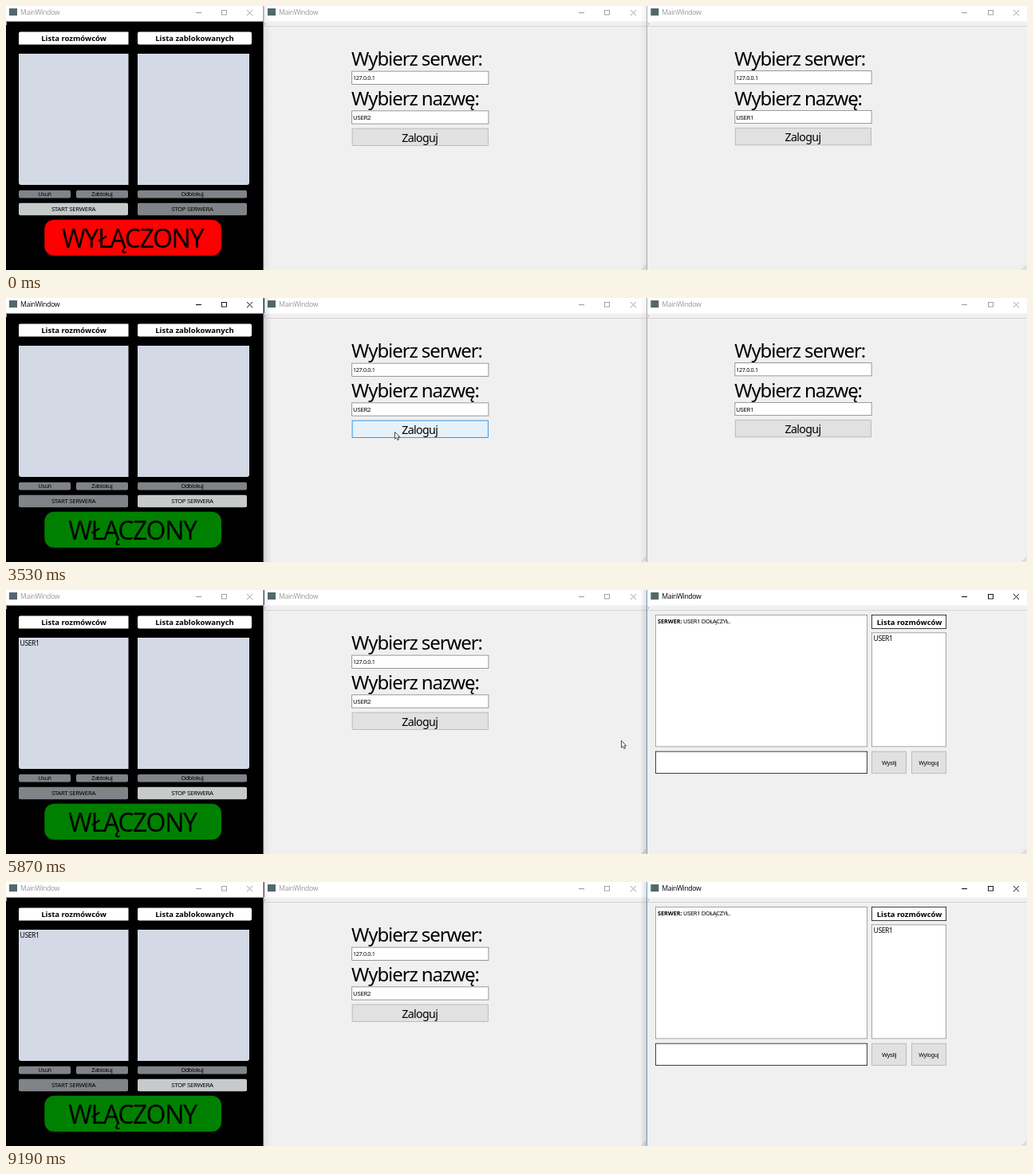
Recreate the animation shown at these times as an HTML page with a canvas. Size 1280 by 332 pixels, loop 9.66 s.

```html
<!DOCTYPE html>
<html lang="pl">
<head>
<meta charset="utf-8">
<title>MainWindow</title>
<style>
html, body { margin: 0; width: 100%; height: 100%; overflow: hidden; background: #f0f0f0; }
canvas { display: block; }
</style>
</head>
<body>
<canvas id="stage" width="1280" height="332"></canvas>
<script>
const ctx = document.getElementById('stage').getContext('2d');
const LOOP = 9660;
const UI = '"Noto Sans", "Open Sans", sans-serif';
const TITLE = '"Open Sans", "Noto Sans", sans-serif';
const TRACKING = -.045; // em, for regular weight

// Pointer path: [step, x, y]
const PATH = [
  [2, 712, 312], [6, 480, 262], [10, 200, 242], [14, 106, 259], [15, 105.5, 259.5], [28, 105.5, 259.5],
  [33, 250, 212], [38, 440, 174], [41, 489, 171], [46, 487, 168], [48, 487, 168],
  [55, 730, 165], [61, 941, 164], [71, 941, 164],
  [76, 771, 189], [79, 450, 150], [81, 250, 123], [83, 119, 220], [84, 150, 315],
  [85, 230, 315], [87, 316, 250], [89, 150, 120], [92, 9, 67], [94, 20, 60], [97, 55, 85],
  [104, 208, 185], [105, 208, 185], [118, 1211, 317]
];

const clamp = v => Math.max(0, Math.min(1, v));
const ramp = (t, start, end) => clamp((t - start) / (end - start));
const mix = (a, b, k) => `rgb(${a.map((v, i) => Math.round(v + (b[i] - v) * k))})`;

function fill(x, y, w, h, color, radius = 0) {
  ctx.fillStyle = color;
  ctx.beginPath();
  ctx.roundRect(x, y, w, h, radius);
  ctx.fill();
}

function box(x, y, w, h, color, border, line = .75) {
  fill(x, y, w, h, border);
  fill(x + line, y + line, w - 2 * line, h - 2 * line, color);
}

function text(str, x, y, size, { align = 'left', color = '#000', weight = 400, font = UI } = {}) {
  ctx.font = `${weight} ${size}px ${font}`;
  ctx.letterSpacing = `${weight === 400 ? size * TRACKING : 0}px`;
  ctx.textAlign = align;
  ctx.fillStyle = color;
  ctx.fillText(str, x, y);
  return ctx.measureText(str).width;
}

const centered = (str, x, y, size, weight) => text(str, x, y, size, { align: 'center', weight });

function titleBar(x, w, controls, active) {
  const color = active ? '#000' : '#999';
  const [min, max, close] = controls;
  fill(x, 0, w, 19.6, '#fff');
  fill(x + 4, 3, 10, 9, '#53676d');
  text('MainWindow', x + 18, 11.3, 8.7, { color, font: TITLE });
  fill(min, 8, 7, 1, color);
  ctx.strokeStyle = color;
  ctx.lineWidth = .9;
  ctx.strokeRect(max + .5, 5.5, 6, 5.5);
  ctx.beginPath();
  ctx.moveTo(close, 5);
  ctx.lineTo(close + 7, 12);
  ctx.moveTo(close + 7, 5);
  ctx.lineTo(close, 12);
  ctx.stroke();
}

function clientArea(x, w) {
  fill(x, 19, w, 313, '#f0f0f0');
  fill(x, 25, w, 1, '#d5d5d5');
  fill(x + 1, 21, 1, 3, '#bbb');
  for (let i = 0; i < 3; i++)
    for (let j = 0; j <= i; j++) fill(x + w - 2 - 2 * j, 326 + 2 * i, 1, 1, '#aaa');
}

function shadow(from, to, strength) {
  const g = ctx.createLinearGradient(from, 0, to, 0);
  g.addColorStop(0, `rgba(0,0,0,${strength})`);
  g.addColorStop(1, 'rgba(0,0,0,0)');
  fill(Math.min(from, to), 0, Math.abs(to - from), 332, g);
}

function serverWindow(active, running, joined) {
  fill(0, 19, 323, 313, '#000');
  titleBar(0, 323, [238, 270, 302], active);
  fill(0, 20, 1, 4, '#aaa');
  fill(16, 32.5, 137.5, 16, '#fff', [2, 0, 0, 0]);
  fill(165, 32.5, 143, 16, '#fff', 2);
  centered('Lista rozmówców', 85, 44, 9.5, 700);
  centered('Lista zablokowanych', 236.5, 44, 9.5, 700);
  fill(16, 60, 137.5, 165, '#d3d9e5', [0, 0, 0, 3]);
  fill(165, 60, 140, 165, '#d3d9e5', [0, 0, 3, 0]);
  if (joined) text('USER1', 17.5, 69.5, 8.6);

  const off = '#808488', on = '#c6cacb';
  const button = (label, x, y, w, h, size, color) => {
    fill(x, y, w, h, color, 2);
    centered(label, x + w / 2, y + h / 2 + size * .35, size);
  };
  button('Usuń', 16, 231.7, 65, 9.8, 7.2, off);
  button('Zablokuj', 88, 231.7, 65, 9.8, 7.2, off);
  button('Odblokuj', 165, 231.7, 137, 9.8, 7.2, off);
  button('START SERWERA', 16, 247.7, 137, 15.6, 7.9, running ? off : on);
  button('STOP SERWERA', 165, 247.7, 137, 15.6, 7.9, running ? on : off);
  fill(48.3, 268.7, 221.7, 45.3, running ? '#008000' : '#f00', 12);
  centered(running ? 'WŁĄCZONY' : 'WYŁĄCZONY', 158.5, 304.3, 32);
}

function loginForm(x, dy, name, hover, press) {
  const field = (label, value, y, size) => {
    text(label, x - 1, y - 6.5 + dy, 24);
    box(x - .7, y + dy, 172, 17, '#fff', '#7a7a7a');
    text(value, x + 1, y + 11.5 + dy, size);
  };
  field('Wybierz serwer:', '127.0.0.1', 81.7, 7.2);
  field('Wybierz nazwę:', name, 131.5, 7.9);
  const color = press ? mix([229, 241, 251], [204, 228, 247], press) : mix([225, 225, 225], [229, 241, 251], hover);
  const border = press ? mix([0, 120, 215], [0, 84, 153], press) : mix([173, 173, 173], [0, 120, 215], hover);
  box(x - .3, 153.7 + dy, 171, 22, color, border, press ? 1.5 : .75);
  centered('Zaloguj', x + 84.7, 170.7 + dy, 14.2);
}

function chat() {
  const grey = '#828790';
  box(814, 31, 266, 166.3, '#fff', grey);
  const w = text('SERWER:', 817, 41.5, 7.2, { weight: 700 });
  text(' USER1 DOŁĄCZYŁ.', 817 + w, 41.5, 7.5);
  box(1085, 31, 94, 17.7, '#fff', '#000');
  centered('Lista rozmówców', 1132.5, 44, 9.5, 700);
  box(1085, 53.6, 94, 143.7, '#fff', grey);
  text('USER1', 1087.5, 64, 8.6);
  box(814, 202.7, 266, 28, '#fff', '#000');
  box(1085, 202.7, 44, 28, '#e1e1e1', '#adadad');
  box(1135, 202.7, 44, 28, '#e1e1e1', '#adadad');
  centered('Wyslij', 1107, 219.5, 7.5);
  centered('Wyloguj', 1156.7, 219.5, 7.2);
}

function pointer(step) {
  let i = PATH.findIndex(p => p[0] > step);
  if (i < 0) i = PATH.length - 1;
  const a = PATH[Math.max(0, i - 1)], b = PATH[i];
  const k = ramp(step, a[0], b[0]);
  ctx.save();
  ctx.translate(a[1] + (b[1] - a[1]) * k + .5, a[2] + (b[2] - a[2]) * k + .5);
  const arrow = new Path2D('M0 0V8.8L2 7 3.5 10.2 5 9.5 3.6 6.4H6.2Z');
  ctx.fillStyle = '#fff';
  ctx.fill(arrow);
  ctx.strokeStyle = '#222';
  ctx.lineWidth = .8;
  ctx.stroke(arrow);
  ctx.restore();
}

function draw(t) {
  const step = Math.floor(2.4 + (t - 140) / 77.35);
  const serverActive = t >= 1900 && t < 5080;
  const chatActive = t >= 5080;
  const joined = t >= 5240;

  clientArea(323, 480);
  titleBar(324, 479, [718, 750, 783], false);
  const hover = ramp(t, 3060, 3380) * (1 - ramp(t, 3830, 4140));
  loginForm(434, 0, 'USER2', hover, 0);

  clientArea(804, 476);
  titleBar(804.3, 476, [1198, 1231, 1263], chatActive);
  if (joined) chat();
  else loginForm(914.2, -.5, 'USER1', ramp(t, 4540, 4770), chatActive ? ramp(t, 5000, 5160) * .5 : 0);

  serverWindow(serverActive, t >= 1980, joined);
  fill(322.3, 0, .8, 332, serverActive ? '#1883d7' : '#888');
  shadow(323, 333, serverActive ? .12 : .05);
  fill(803, 0, .8, 332, chatActive ? '#6f9cc4' : '#aaa');
  shadow(803, 795, chatActive ? .12 : .05);

  if (t >= 140 && t < 9190) pointer(step);
}

function frame() {
  draw(performance.now() % LOOP);
  requestAnimationFrame(frame);
}
frame();
</script>
</body>
</html>
```
